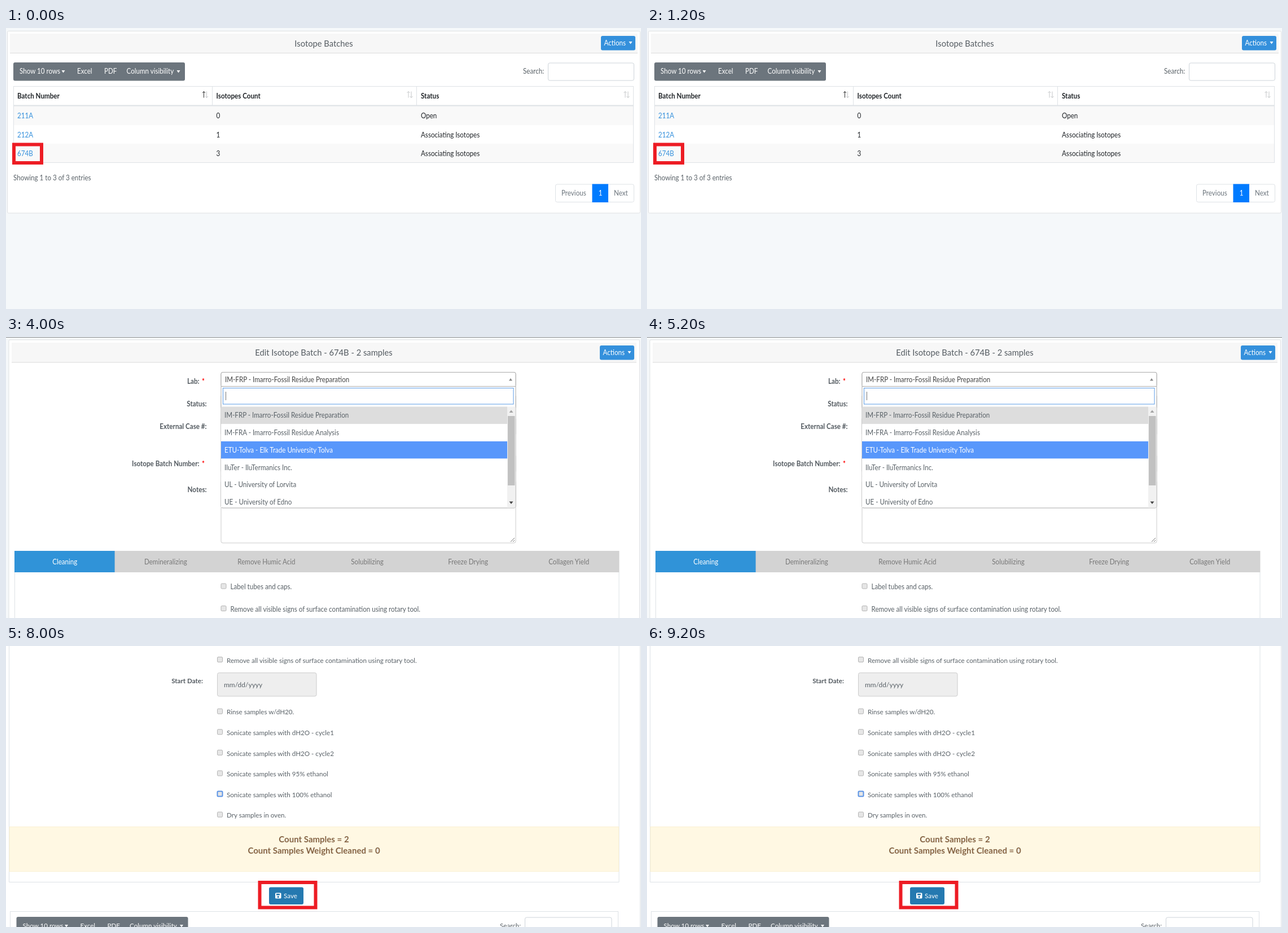
An HTML page for the animation above (10000 ms loop, 1125 px wide and 498 px high).

```html
<!DOCTYPE html>
<html lang="en">
<head>
<meta charset="utf-8">
<title>Isotope batch walkthrough</title>
<style>
  html, body { margin: 0; width: 100%; height: 100%; overflow: hidden; background: #f5f8fa; }
  svg { display: block; width: 1125px; height: 498px; }
  text { font-family: Lato, sans-serif; white-space: pre; }
</style>
</head>
<body>
<svg id="stage" viewBox="0 0 1125 498"></svg>
<script>
const BLUE = '#3490dc', TAB_BLUE = '#3093d8', RED = '#ed1c24', GRAY = '#6c757d';
const LINE = '#dee2e6', INK = '#212529', SOFT = '#5a6268';
const FONT = 11.63;
let tall = 1.07; // the pages are shown slightly taller than wide, except the last one

// Edges are given as left, top, right, bottom.
const box = (l, t, r, b, fill, stroke = 'none', rx = 0, extra = '') =>
  `<rect x="${l}" y="${t}" width="${r - l}" height="${b - t}" rx="${rx}" fill="${fill}" stroke="${stroke}" ${extra}/>`;
const path = (d, stroke, width = 1, fill = 'none') =>
  `<path d="${d}" fill="${fill}" stroke="${stroke}" stroke-width="${width}"/>`;

// y is the middle of the capitals.
function text(x, y, content, { fill = SOFT, size = FONT, weight = 400, anchor = 'start', style = 'normal' } = {}) {
  const baseline = y + size * 0.36 * tall;
  return `<text transform="translate(${x} ${baseline}) scale(1 ${tall})" fill="${fill}" font-size="${size}"
    font-weight="${weight}" font-style="${style}" text-anchor="${anchor}">${content}</text>`;
}

const caret = (x, y, fill, half = 3, up = false) =>
  path(`M${x - half} ${y + (up ? 2 : -2)}h${2 * half}l${-half} ${up ? -4.5 : 4.5}z`, 'none', 0, fill);
const highlight = (l, t, r, b) => box(l + 3, t + 3, r - 3, b - 3, 'none', RED, 0, 'stroke-width="6"');
const grip = (r, b) => path(`M${r - 9} ${b - 2}l7 -7M${r - 5} ${b - 2}l3 -3`, '#777');

function card(l, t, r, b, header, title, titleX) {
  const [hl, ht, hr, hb] = header;
  return box(0, 0, 1125, 498, '#f5f8fa') + box(l, t, r, b, '#fff', '#dfe1e3', 2) +
    box(hl, ht, hr, hb, '#f7f7f7') + path(`M${hl} ${hb - 0.5}H${hr}`, '#dcdcdc') +
    text(titleX, (ht + hb) / 2, title, { size: 14.75, anchor: 'middle', fill: '#555c62' });
}

function actions(l, t, fill = BLUE, ring = 'none') {
  return box(l, t, l + 61, t + 25.5, fill, ring, 3, 'stroke-width="2"') +
    text(l + 5.5, t + 13, 'Actions', { fill: '#fff' }) + caret(l + 52.5, t + 12, '#fff');
}

function toolbar(x, y, searchX, inputWidth) {
  const labels = [[11, 'Show 10 rows'], [113, 'Excel'], [161, 'PDF'], [200.5, 'Column visibility']];
  return box(x, y, x + 304, y + 32.5, GRAY, 'none', 3) +
    labels.map(([dx, label]) => text(x + dx, y + 16, label, { fill: '#fff' })).join('') +
    caret(x + 88.5, y + 16, '#fff') + caret(x + 292.5, y + 16, '#fff') +
    text(searchX, y + 16, 'Search:') +
    box(searchX + 44.5, y + 1, searchX + 44.5 + inputWidth, y + 32, '#fff', '#ced4da', 3);
}

function sortArrows(x, active) {
  const arrow = (ax, d, color) => path(`M${ax} 112.5v11M${ax - 2.5} ${118 + 3 * d}l2.5 ${2.5 * d}l2.5 ${-2.5 * d}`, color);
  return arrow(x, -1, active ? '#333' : '#c4c6c8') + arrow(x + 5, 1, '#c4c6c8');
}

function checkbox(x, y, label, border = '#b4b4b4', width = 1) {
  return box(x - 4.5, y - 4.5, x + 4.5, y + 4.5, '#e6e6e6', border, 1.5, `stroke-width="${width}"`) +
    text(x + 12, y + 1.5, label);
}

function label(right, y, content, required) {
  const end = required ? right - 13 : right;
  return text(end, y, content, { weight: 700, anchor: 'end', fill: '#535a60' }) +
    (required ? text(end + 4.5, y, '*', { weight: 700, fill: '#f00' }) : '');
}

function select(l, t, r, content, fill) {
  return box(l, t, r, t + 25.5, fill, '#aaa', 3) + text(l + 7.5, t + 13.2, content, { fill: '#444' }) +
    caret(r - 9.5, t + 13, '#888');
}

const input = (l, t, r, b, fill, stroke = '#ccc') => box(l, t, r, b, fill, stroke, 3);

function tabs(l, t, r) {
  const names = ['Cleaning', 'Demineralizing', 'Remove Humic Acid', 'Solubilizing', 'Freeze Drying', 'Collagen Yield'];
  const step = (r - l) / names.length;
  return box(l, t, r, t + 38, '#d3d3d3') + box(l, t, l + step - 1, t + 38, TAB_BLUE) +
    names.map((name, i) => text(l + step * (i + 0.5), t + 19.3, name,
      { anchor: 'middle', fill: i ? '#777' : '#fff' })).join('') +
    path(`M${l + .5} ${t + 38}V498M${r - .5} ${t + 38}V498`, LINE);
}

const STEPS = ['Label tubes and caps.', 'Remove all visible signs of surface contamination using rotary tool.', 'Rinse samples w/dH20.'];
const LAB = 'IM-FRP - Imarro-Fossil Residue Preparation';
const LABS = [LAB, 'IM-FRA - Imarro-Fossil Residue Analysis', 'ETU-Tolva - Elk Trade University Tolva',
  'IluTer - IluTermanics Inc.', 'UL - University of Lorvita', 'UE - University of Edno'];

// Shared batch form; rows holds the middle of each of the five labelled rows.
function batchForm({ l, r, labelRight, rows, editable, notesTop, notesBottom, tabBox, checkY }) {
  const [lab, status, external, number, notes] = rows;
  const open = editable ? '#fff' : '#eee';
  return label(labelRight, lab, 'Lab:', true) + label(labelRight, status, 'Status:') +
    label(labelRight, external, 'External Case #:') + label(labelRight, number, 'Isotope Batch Number:', true) +
    label(labelRight, notes, 'Notes:') +
    select(l, lab - 16, r, LAB, open) + select(l, status - 16.5, r, 'Associating Isotopes', '#eee') +
    input(l, external - 16, r, external + 16, open) +
    text(l + 10, external, 'e.g. 2004H0114, 2015G1022', { fill: '#aaa', style: 'italic' }) +
    input(l, number - 16, r, number + 16, '#eee') + text(l + 10.5, number, '674B') +
    input(l, notesTop, r, notesBottom, open) + grip(r, notesBottom) + tabs(...tabBox) +
    STEPS.map((step, i) => checkbox(l + 4.5, checkY + 39.5 * i, step, editable ? '#b4b4b4' : '#d0d0d0')).join('');
}

function batchList() {
  const rows = [['211A', '0', 'Open'], ['212A', '1', 'Associating Isotopes'], ['674B', '3', 'Associating Isotopes']];
  const columns = [20, 372.5, 735];
  const heads = ['Batch Number', 'Isotopes Count', 'Status'];
  return card(2.5, 5.5, 1123.5, 328, [7, 10, 1119, 45], 'Isotope Batches', 563) + actions(1054, 14) +
    toolbar(13, 61, 916, 152) +
    box(13, 138, 1112, 172, '#f9f9f9') + box(13, 205, 1112, 239, '#f9f9f9') +
    box(13.5, 103.5, 1111.5, 238.5, 'none', LINE) + path('M13 137.5H1112', LINE, 2) +
    path('M365.5 104V137M727.5 104V137', LINE) +
    heads.map((head, i) => text(columns[i], 121, head, { weight: 700, fill: INK })).join('') +
    sortArrows(350.5, true) + sortArrows(713, false) + sortArrows(1097, false) +
    rows.map((row, i) => row.map((cell, j) =>
      text(columns[j], 156 + 33.2 * i, cell, { fill: j ? INK : BLUE })).join('')).join('') +
    highlight(11, 203.5, 66, 242) + text(13, 265.5, 'Showing 1 to 3 of 3 entries') +
    box(973.5, 277, 1112.5, 308.5, '#fff', LINE, 3) + box(1038.5, 276.5, 1067, 309, '#007bff') +
    text(984, 293, 'Previous', { fill: GRAY }) + text(1053, 293, '1', { fill: '#fff', anchor: 'middle' }) +
    text(1077, 293, 'Next', { fill: GRAY });
}

function actionMenu() {
  const ink = '#343a40';
  const listIcon = box(1018.5, 52.5, 1029, 61.5, 'none', ink, 1, 'stroke-width="1.5"') +
    path('M1020.5 55h1.5M1023 55h4.5M1020.5 57.3h1.5M1023 57.3h4.5M1020.5 59.6h1.5M1023 59.6h4.5', ink, 1.2);
  const fileIcon = path('M1019.5 77h5v4h3.5v7.5h-8.5zM1025.3 77l2.7 3h-2.7z', 'none', 0, ink);
  const editIcon = path('M1025 104h-6.5v9.5h9v-4.5', ink, 1.5) + path('M1021.5 110.5l.6-2.6l5.6-5.8l2 2l-5.6 5.8z', 'none', 0, ink);
  return box(999.5, 39.5, 1130, 123, '#fff', '#d0d2d4', 3, 'style="filter:drop-shadow(0 3px 5px #0003)"') +
    box(1000, 95, 1125, 121, '#f8f9fa') + listIcon + fileIcon + editIcon +
    ['All', 'Create', 'Edit'].map((item, i) => text(1036, 57 + 25.6 * i, item, { fill: '#41484e' })).join('') +
    highlight(996, 91, 1125, 124.5);
}

function viewBatch() {
  return card(.5, 1.5, 1123.5, 510, [5, 6, 1119, 42], 'View Isotope Batch - 674B - 2 samples', 561.5) +
    batchForm({ l: 378.5, r: 903.5, labelRight: 353, rows: [74.5, 114.5, 154, 200, 245.5], notesTop: 229.5,
      notesBottom: 341, tabBox: [11, 354, 1087.5], checkY: 417 }) +
    actions(1053, 11, '#0062cc', '#58a3f5') + actionMenu();
}

function labDropdown() {
  const items = LABS.map((name, i) => {
    const top = 123.5 + 30.7 * i;
    const back = i === 0 ? '#ddd' : i === 2 ? '#5897fb' : '#fff';
    return box(381, top, 888, Math.min(top + 30.7, 302), back) +
      text(387, top + 15.5, name, { fill: i === 2 ? '#fff' : SOFT });
  }).join('');
  return box(381, 62.5, 903, 303, '#fff', '#aaa', 3) + path('M381 87.5H903', '#aaa') +
    text(388, 75.6, LAB, { fill: '#444' }) + caret(894, 75.5, '#888', 3, true) +
    box(384.5, 90.5, 899, 119, '#fff', '#5b9be6') + path('M389.5 97V112', '#777') + items +
    box(888, 123.5, 902.5, 302.5, '#f1f1f1') + box(889, 140, 901.5, 263, '#c1c1c1') +
    caret(895, 132, '#a3a3a3', 3.5, true) + caret(895, 293.5, '#444', 3.5);
}

function chooseLab() {
  return card(5, 5, 1122.5, 510, [10, 10, 1117, 45.5], 'Edit Isotope Batch - 674B - 2 samples', 563) +
    path('M0 .5H1125', '#85888b') + actions(1052, 15) +
    batchForm({ l: 381, r: 903, labelRight: 355.5, rows: [78.5, 118.5, 158.5, 224.5, 270.5], editable: true,
      notesTop: 254, notesBottom: 365, tabBox: [15, 379, 1086.5], checkY: 441.5 }) + labDropdown();
}

function addNotes() {
  return card(3.5, 3.5, 1123.5, 510, [8, 9, 1118, 43.5], 'Edit Isotope Batch - 674B - 2 samples', 563.5) + actions(1053, 13) +
    batchForm({ l: 381, r: 904, labelRight: 355, rows: [76.5, 117, 156.5, 223, 269], editable: true,
      notesTop: 253, notesBottom: 365, tabBox: [14, 379, 1087.5], checkY: 442.5 }) +
    box(381, 253, 904, 365, '#fff', '#94c9ee', 3, 'style="filter:drop-shadow(0 0 3px #66afe966)"') +
    grip(904, 365) + path('M385.5 183.5l2 3.5l4.5-9', '#444', 1.2) +
    text(391, 269.5, 'Add notes', { fill: '#495057' }) + path('M442.5 262V277', '#333') +
    '<circle cx="885" cy="348" r="9.7" fill="#15c39a"/>';
}

function saveBatch() {
  const steps = [STEPS[2], 'Sonicate samples with dH2O - cycle1', 'Sonicate samples with dH2O - cycle2',
    'Sonicate samples with 95% ethanol', 'Sonicate samples with 100% ethanol', 'Dry samples in oven.'];
  const summary = { size: 15, weight: 700, anchor: 'middle', fill: '#856445' };
  const focusRing = ['#5b93e6', 2];
  const saveIcon = box(477, 437.5, 487.5, 447.5, '#fff', 'none', 1.5) + box(479, 439, 485, 441.7, '#2579b0') +
    '<circle cx="482.2" cy="444.7" r="1.6" fill="#2579b0"/>';
  return box(0, 0, 1125, 498, '#fff') + box(1123, 0, 1125, 498, '#f5f8fa') + path('M1123.5 0V498', LINE) +
    path('M5.5 0V418.5H1086V0', LINE) + checkbox(379, 24, STEPS[1]) +
    label(349, 62, 'Start Date:') + input(374.5, 47.5, 550, 89, '#eee') + text(386, 68.5, 'mm/dd/yyyy', { size: 12 }) +
    steps.map((step, i) => checkbox(379, 115.7 + 36.6 * i, step, ...(i === 4 ? focusRing : []))).join('') +
    box(6, 320.5, 1085.5, 399.5, '#fff8e3', '#faf0d2') +
    text(545.5, 342.5, 'Count Samples = 2', summary) + text(545.5, 363, 'Count Samples Weight Cleaned = 0', summary) +
    highlight(446.5, 416, 551.5, 466.5) + box(466, 427.5, 527, 458, '#2579b0', 'none', 3) + saveIcon +
    text(492, 442.5, 'Save', { fill: '#fff' }) +
    box(7.5, 470.5, 1084.5, 510, '#fff', LINE) + toolbar(18.5, 480, 875, 153.5);
}

const scenes = [batchList, viewBatch, chooseLab, addNotes].map(draw => draw());
tall = 1;
scenes.push(saveBatch());

const stage = document.getElementById('stage');
stage.innerHTML = scenes.map(scene => `<g display="none">${scene}</g>`).join('');
const groups = [...stage.children];
const start = performance.now();

function tick() {
  const current = Math.floor((performance.now() - start) / 2000) % groups.length;
  groups.forEach((group, i) => group.setAttribute('display', i === current ? 'inline' : 'none'));
  requestAnimationFrame(tick);
}
tick();
</script>
</body>
</html>
```
